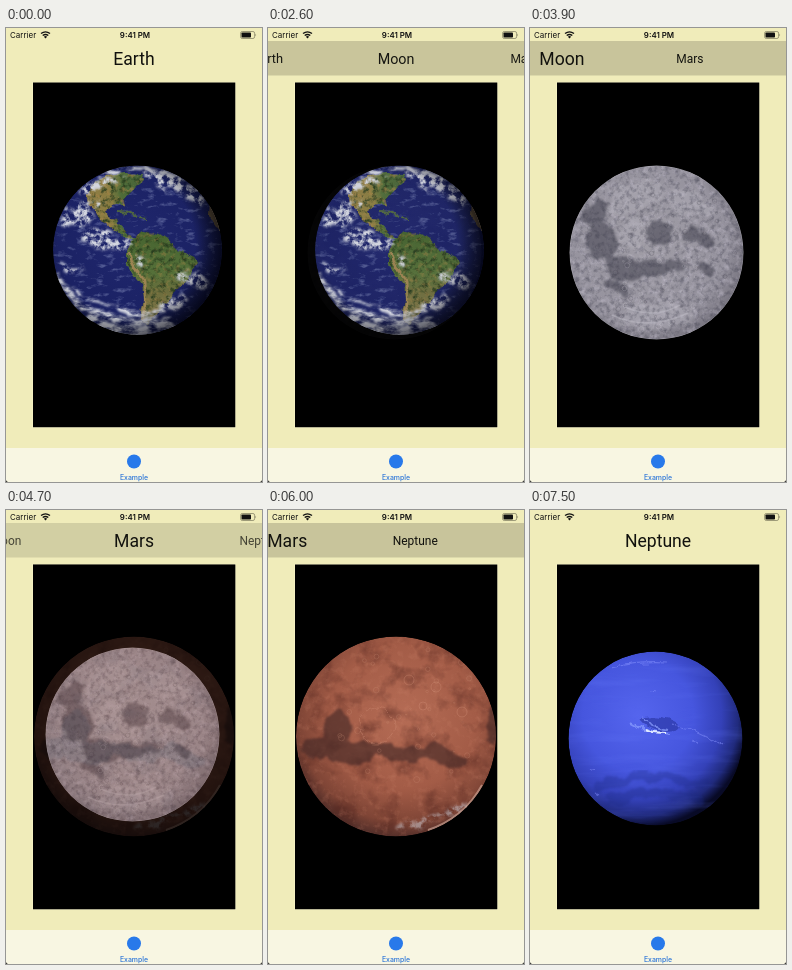
An HTML page that plays this animation: 256x454 px, repeating every 7600 ms.

```html
<!DOCTYPE html>
<html lang="en">
<head>
<meta charset="utf-8">
<title>Planets</title>
<style>
html, body { margin: 0; width: 100%; height: 100%; overflow: hidden; background: #f0ecba; }
svg { display: block; width: 100vw; height: 100vh; }
.ui { font-family: Inter, sans-serif; }
.title { font: 17.6px Roboto, sans-serif; text-anchor: middle; fill: #11110d; }
</style>
</head>
<body>
<svg viewBox="0 0 256 454">
  <defs>
    <clipPath id="photo"><rect x="27" y="54.500" width="202.300" height="344.800"/></clipPath>
    <clipPath id="earthDisc"><circle cx="131.5" cy="222" r="84.5"/></clipPath>
    <clipPath id="moonDisc"><circle cx="126.5" cy="224.5" r="87"/></clipPath>
    <clipPath id="marsDisc"><circle cx="128" cy="226.5" r="100"/></clipPath>
    <clipPath id="neptuneDisc"><circle cx="125.5" cy="228.5" r="87"/></clipPath>

    <radialGradient id="sea" cx=".45" cy=".45" r=".56">
      <stop offset="0" stop-color="#20276e"/><stop offset=".75" stop-color="#1b2264"/><stop offset="1" stop-color="#141a48"/>
    </radialGradient>
    <radialGradient id="night" cx=".42" cy=".46" r=".6">
      <stop offset=".7" stop-color="#000" stop-opacity="0"/><stop offset="1" stop-color="#00000c" stop-opacity=".8"/>
    </radialGradient>
    <linearGradient id="north"><stop offset="0" stop-color="#8f7c44"/><stop offset=".4" stop-color="#8a7d42"/><stop offset=".6" stop-color="#4f6c38"/><stop offset="1" stop-color="#46623a"/></linearGradient>
    <linearGradient id="south" x1="0" y1="0" x2="0" y2="1"><stop offset="0" stop-color="#45632f"/><stop offset=".45" stop-color="#557039"/><stop offset=".65" stop-color="#6d6d3d"/><stop offset="1" stop-color="#877a4c"/></linearGradient>
    <radialGradient id="dust" cx=".45" cy=".45" r=".56">
      <stop offset="0" stop-color="#a09da6"/><stop offset=".8" stop-color="#96939e"/><stop offset="1" stop-color="#7b7883"/>
    </radialGradient>
    <radialGradient id="rust" cx=".54" cy=".4" r=".6">
      <stop offset="0" stop-color="#b56c55"/><stop offset=".6" stop-color="#a35c47"/><stop offset=".88" stop-color="#7f4536"/><stop offset="1" stop-color="#56302a"/>
    </radialGradient>
    <radialGradient id="ice" cx=".4" cy=".37" r=".64">
      <stop offset="0" stop-color="#5565ee"/><stop offset=".5" stop-color="#4656de"/><stop offset=".75" stop-color="#3441b8"/><stop offset=".9" stop-color="#202a7c"/><stop offset="1" stop-color="#080a26"/>
    </radialGradient>
  </defs>

  <rect width="256" height="454" fill="#f0ecba"/>
  <rect id="band" y="13" width="256" height="34.5"/>
  <g id="titles"></g>

  <g class="ui" fill="#111">
    <text x="4" y="9.9" font-size="8">Carrier</text>
    <text x="129" y="9.9" font-size="7.9" font-weight="600" text-anchor="middle">9:41 PM</text>
    <g fill="none" stroke="#111" stroke-width="1.3">
      <path d="M35 5.6q4.500-3.600 9 0M36.700 7.600q2.800-2.200 5.600 0"/>
      <rect x="234.600" y="3.500" width="14" height="7" rx="1.700" stroke-width=".6" stroke="#66644c"/>
    </g>
    <path d="M37.900 8.700q1.600-1.200 3.200 0l-1.600 1.900z"/>
    <rect x="235.500" y="4.400" width="9.500" height="5.200" rx=".8"/>
    <path d="M249.500 5.800q1.300 1.200 0 2.400z" fill="#66644c"/>
  </g>

  <rect x="26.500" y="54" width="203.400" height="346" fill="#f8f4c8"/>
  <g id="photos" clip-path="url(#photo)"></g>

  <rect y="420" width="256" height="34" fill="#f8f6e2"/>
  <circle cx="128" cy="433.500" r="7" fill="#2879ea"/>
  <text class="ui" x="128" y="451.600" font-size="6.900" font-weight="500" text-anchor="middle" fill="#2a74d8">Example</text>
  <path d="M0 452v2h2q-1.700-.3-2-2zM256 452v2h-2q1.700-.3 2-2z" fill="#222"/>
</svg>
<script>
const $ = id => document.getElementById(id);
const LOOP = 7600, GAP = 128;
const names = ['Earth', 'Moon', 'Mars', 'Neptune'];
const settle = [2517, 4440, 6440];   // when each new title is chosen
const clamp = v => Math.max(0, Math.min(1, v));
const smooth = v => (1 - Math.cos(Math.PI * clamp(v))) / 2;

// Filters: grain fills a shape with noise, rough frays its edge, cloud tears it into wisps
const noise = (freq, seed) =>
  `<feTurbulence type="fractalNoise" baseFrequency="${freq}" numOctaves="4" seed="${seed}" result="n"/>`;
const filter = (id, body) =>
  `<filter id="${id}" x="-20%" y="-20%" width="140%" height="140%" color-interpolation-filters="sRGB">${body}</filter>`;
const tint = (rgb, gain, bias) =>
  `<feColorMatrix in="n" values="0 0 0 0 ${rgb[0]} 0 0 0 0 ${rgb[1]} 0 0 0 0 ${rgb[2]} 0 0 0 ${gain} ${bias}"/>`;
const grain = (id, freq, seed, rgb, gain, bias) =>
  filter(id, noise(freq, seed) + tint(rgb, gain, bias) + '<feComposite in2="SourceGraphic" operator="in"/>');
const shift = (scale, blur) =>
  `<feDisplacementMap in="SourceGraphic" in2="n" scale="${scale}" xChannelSelector="R" yChannelSelector="G"/>
   <feGaussianBlur stdDeviation="${blur}" result="c"/>`;
const rough = (id, freq, scale, blur) => filter(id, noise(freq, 4) + shift(scale, blur));
const cloud = (id, scale, blur, freq, gain, bias) => filter(id, noise(.07, 9) + shift(scale, blur) +
  noise(freq, 21) + tint([.83, .84, .88], gain, bias) + '<feComposite in2="c" operator="in"/>');
document.querySelector('defs').insertAdjacentHTML('beforeend',
  rough('coast', .09, 8, .35) + rough('mare', .05, 18, 1.2) +
  cloud('wisp', 18, 1.8, .16, 4, -1.5) + cloud('swirl', 11, 1, '.07 .16', 3, -.8) +
  grain('haze', '.1 .2', 31, [.62, .66, .82], 3.5, -1.95) +
  grain('soil', .2, 12, [.66, .52, .28], 3.5, -1.8) +
  grain('woods', .2, 33, [.16, .24, .12], 3, -1.4) +
  grain('pits', .2, 5, [.22, .22, .28], 2, -.9) +
  grain('glow', .16, 17, [.82, .8, .86], 2, -.95) +
  grain('stain', .045, 8, [.3, .13, .11], 2.4, -1.15) +
  grain('sand', .14, 40, [.8, .52, .42], 2, -1) +
  grain('flow', '.012 .09', 6, [.42, .5, 1], 1.6, -.75));

let state = 7;
const rnd = () => (state = state * 16807 % 2147483647) / 2147483647;
const rings = (n, cx, cy, r, size, color) => Array.from({ length: n }, () => {
  const a = rnd() * 6.283, d = Math.sqrt(rnd()) * r;
  return `<circle cx="${(cx + d * Math.cos(a)).toFixed(1)}" cy="${(cy + d * Math.sin(a)).toFixed(1)}"
    r="${(.5 + rnd() * size).toFixed(1)}" fill="none" stroke="${color}" stroke-width=".6"/>`;
}).join('');
const blob = (x, y, rx, ry, turn = 0) =>
  `<ellipse cx="${x}" cy="${y}" rx="${rx}" ry="${ry}" transform="rotate(${turn} ${x} ${y})"/>`;
const disc = (cx, cy, r, attr) => `<circle cx="${cx}" cy="${cy}" r="${r}" ${attr}/>`;

const pictures = {
  earth: (() => {
    const all = attr => disc(131.5, 222, 84.5, attr);
    const north = 'M81 168L86 156 100 148 118 146 136 147 138 153 130 159 124 165 118 172 119 179 114 175 105 177 101 184 104 190 111 191 113 197 122 205 128 210 123 211 113 204 102 198 94 192 89 183 82 177Z';
    const south = 'M124 213L136 203 149 205 161 210 170 220 189 229 191 236 184 244 180 255 170 262 162 272 154 280 147 289 142 297 136 294 135 284 138 271 136 257 128 247 121 235 121 224Z';
    return all('fill="url(#sea)"') + all('filter="url(#haze)" opacity=".4"') +
      `<g filter="url(#coast)"><path d="${north}" fill="url(#north)"/><path d="${south}" fill="url(#south)"/>
        <path d="M203 176l7 5 8 22-8-4-8-12z" fill="#6b5a3a"/>
        <path d="M112 184l10 1 9 4M133 190l8 1" fill="none" stroke="#4f6640" stroke-width="2"/></g>
      <g filter="url(#woods)"><path d="${north}"/><path d="${south}"/></g>
      <g filter="url(#soil)" opacity=".6"><path d="${north}"/><path d="${south}" opacity=".75"/></g>
      <path d="M123 226q5 14 16 27 2 20-3 39" fill="none" stroke="#9c8452" stroke-width="2.500" filter="url(#coast)"/>
      <g fill="#fff" filter="url(#wisp)">` +
      blob(163, 153, 27, 8, 24) + blob(186, 166, 13, 7, 40) + blob(101, 153, 16, 4, -15) +
      blob(74, 187, 14, 10, -35) + blob(84, 162, 9, 6, -45) + blob(61, 192, 6, 9) + blob(93, 174, 6, 4) +
      blob(92, 210, 18, 9, 12) + blob(114, 216, 13, 6, -10) + blob(133, 231, 10, 4, 40) +
      blob(188, 252, 15, 6, 28) + blob(165, 276, 15, 6, -15) + blob(66, 240, 12, 3, 25) +
      `</g><g fill="none" stroke="#fff" filter="url(#swirl)">
        <path d="M93 150q35-22 77 1" stroke-width="5"/>
        <path d="M51 247q16 30 47 40t52 4" stroke-width="6"/><path d="M80 288q40 26 88 6" stroke-width="10"/>
        <path d="M108 278q28 16 64-2" stroke-width="5"/><path d="M66 258q18 18 42 22" stroke-width="3"/></g>` +
      all('fill="url(#night)"');
  })(),

  moon: (() => {
    const all = attr => disc(126.5, 224.5, 87, attr);
    return all('fill="url(#dust)"') + all('filter="url(#glow)" opacity=".5"') +
      '<g fill="#565561" opacity=".72" filter="url(#mare)">' +
      blob(68, 186, 11, 14, 30) + blob(72, 214, 15, 19, -15) + blob(97, 240, 24, 10, 15) +
      blob(132, 238, 24, 7) + blob(129, 206, 14, 12) + blob(165, 204, 9, 7) +
      blob(177, 212, 8, 8) + blob(177, 242, 10, 7) + blob(86, 256, 12, 7, 30) + '</g>' +
      `<g fill="#b5b2bb" opacity=".4" filter="url(#mare)">` + blob(105, 170, 30, 14, -20) + blob(160, 176, 26, 12, 25) +
      blob(128, 288, 38, 14) + blob(100, 207, 9, 14) + '</g>' +
      all('filter="url(#pits)" opacity=".5"') +
      '<g opacity=".35">' + rings(46, 126, 225, 83, 2, '#3f3d48') + rings(30, 128, 260, 45, 2.2, '#d4d0d8') + '</g>' +
      `<path d="M82 287q35 17 76-2M95 279q28 13 55-2" fill="none" stroke="#c6c3cc" stroke-width="1.500" opacity=".4"/>` +
      all('fill="none" stroke="#bab7c0" stroke-width="1" opacity=".5"');
  })(),

  mars: (() => {
    const all = attr => disc(128, 226.5, 100, attr);
    return all('fill="url(#rust)"') + all('filter="url(#stain)" opacity=".5"') + all('filter="url(#sand)" opacity=".35"') +
      '<g fill="#422726" opacity=".62" filter="url(#mare)">' +
      blob(68, 222, 15, 20, 20) + blob(78, 242, 28, 9, 5) + blob(127, 242, 36, 8, 8) +
      blob(174, 246, 24, 9, 12) + blob(48, 238, 13, 13) + blob(224, 216, 5, 17) + '</g>' +
      `<g fill="none" stroke="#cf8d75" stroke-width="1" opacity=".4">
        <circle cx="109" cy="216" r="18" filter="url(#coast)"/><circle cx="141" cy="170" r="5"/><circle cx="168" cy="177" r="5"/>
        <circle cx="194" cy="202" r="5"/><circle cx="155" cy="196" r="4"/></g>
      <g opacity=".35">` + rings(34, 140, 200, 78, 2.6, '#d69a82') + '</g>' +
      `<g fill="#d9aaa0" filter="url(#wisp)" opacity=".5">` + blob(155, 311, 26, 3, -12) + blob(190, 299, 17, 5, -35) + '</g>' +
      `<path d="M160 320q36-12 54-45" fill="none" stroke="#e8c4b4" stroke-width="2" opacity=".5"/>`;
  })(),

  neptune: (() => {
    const all = attr => disc(125.5, 228.5, 87, attr);
    return all('fill="url(#ice)"') + all('filter="url(#flow)" opacity=".3"') +
      `<g filter="url(#mare)" fill="none" stroke="#1d297f">
        <path d="M67 277q45-22 108-2" stroke-width="9" opacity=".3"/><path d="M75 291q48-13 97-2" stroke-width="10" opacity=".3"/></g>
      <g filter="url(#coast)"><ellipse cx="130" cy="214" rx="20" ry="7" transform="rotate(10 130 214)" fill="#2a37a4" opacity=".65"/>
        <path d="M100 213q13 8 40 11M113 207l8 9 17 4" fill="none" stroke="#8ca0ff" stroke-width="1.800" opacity=".7"/>
        <path d="M114 219l8 3 14 1" fill="none" stroke="#e2ebff" stroke-width="2.200"/>
        <path d="M142 215q30 5 50 20M80 158q28-7 57-5M58 262l7-2M66 283l4 2M161 231l8 2M118 182l9 1" fill="none" stroke="#8794ff" stroke-width="1.200" opacity=".5"/></g>`;
  })()
};

$('photos').innerHTML = Object.entries(pictures).map(([k, art]) =>
  `<g class="pic"><rect x="26" y="54" width="204" height="346"/><g clip-path="url(#${k}Disc)">${art}</g></g>`).join('');
$('titles').innerHTML = names.map(n => `<text class="title" y="6.400">${n}</text>`).join('');
const pics = [...document.querySelectorAll('.pic')];
const titles = [...document.querySelectorAll('.title')];

function draw(t) {
  let pos = 0, chosen = 0, show = 0;
  const fade = [1];
  for (const s of settle) {
    const start = s - 990;
    pos += 1 - (1 - clamp((t - start) / 900)) ** 2;
    chosen += clamp((t - s) / 200);
    const p = smooth((t - s) / 750);
    fade.push(p);
    show += clamp((t - start + 100) / 200) * (1 - p);
  }
  $('band').setAttribute('opacity', .17 * show);
  titles.forEach((el, i) => {
    const off = i - chosen;
    const w = clamp(1 - (off < 0 ? -2 * off : off));   // shrinks twice as fast as it grows
    el.setAttribute('transform', `translate(${128 + (i - pos) * GAP} 30.5) scale(${.68 + .32 * w})`);
    el.setAttribute('opacity', Math.max(show, w));
  });
  pics.forEach((el, i) => {
    const hidden = !fade[i] || fade[i + 1] === 1;
    el.setAttribute('display', hidden ? 'none' : 'inline');
    el.setAttribute('opacity', fade[i]);
  });
}

const begin = performance.now();
function tick() {
  draw((performance.now() - begin) % LOOP);
  requestAnimationFrame(tick);
}
draw(0);
requestAnimationFrame(tick);
</script>
</body>
</html>
```
